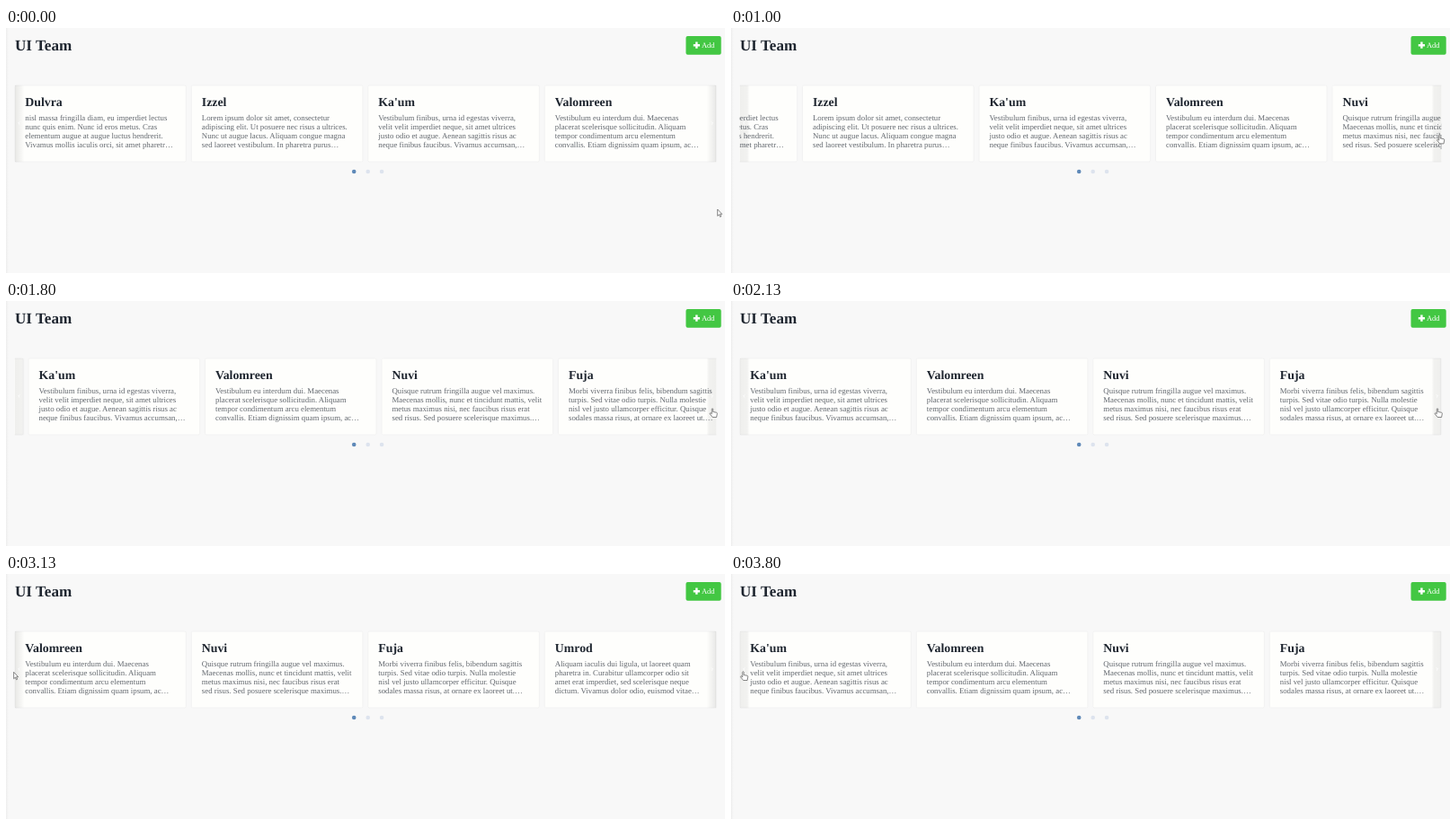
An HTML page that plays this animation: 800 by 273 pixels, repeating every 3.99 s.

```html
<!DOCTYPE html>
<html lang="en">
<head>
<meta charset="utf-8">
<title>Team carousel</title>
<style>
  html, body { margin: 0; width: 100%; height: 100%; overflow: hidden; background: #f8f8f8; }
  svg { display: block; font-family: "Liberation Serif", "Times New Roman", serif; text-rendering: geometricPrecision; }
  .heading { font-weight: bold; fill: #1f2630; }
  .body { font-size: 8.8px; fill: #62676e; }
  .card { fill: #fefefc; stroke: #f0f0f0; stroke-width: .8; }
  .pointer { fill: #fff; stroke: #555; stroke-width: .7; stroke-linejoin: round; }
</style>
</head>
<body>
<svg width="800" height="273" viewBox="0 0 800 273">
  <defs>
    <linearGradient id="shade"><stop stop-opacity=".09"/><stop offset="1" stop-opacity="0"/></linearGradient>
    <linearGradient id="flat"><stop stop-opacity=".06"/><stop offset=".75" stop-opacity=".05"/><stop offset="1" stop-opacity="0"/></linearGradient>
    <linearGradient id="edge"><stop stop-color="#eee"/><stop offset="1" stop-color="#f8f8f8"/></linearGradient>
    <clipPath id="view"><rect x="9.5" y="60" width="781" height="93"/></clipPath>
    <g id="arrow"><rect width="11" height="85.5"/><path d="M5.6 40.6 L4 42.2 L5.6 43.8" fill="none" stroke="#fff" stroke-width="1"/></g>
  </defs>
  <rect width="800" height="273" fill="#f8f8f8"/>
  <rect width="3" height="273" fill="url(#edge)"/>
  <text class="heading" x="10" y="25.3" font-size="17.1">UI Team</text>

  <rect x="756.5" y="9" width="39.2" height="20.8" rx="2" fill="#43c743"/>
  <path d="M764.8 19.2h7.2M768.4 15.6v7.2" stroke="#fff" stroke-width="2.4"/>
  <text x="773.9" y="22.1" font-size="8.5" fill="#fff">Add</text>

  <g clip-path="url(#view)">
    <g id="track"></g>
    <use id="left" href="#arrow" transform="translate(9.7 63.8)"/>
    <use id="right" href="#arrow" transform="translate(790.5 63.8) scale(-1 1)"/>
  </g>

  <g fill="#dde3ee">
    <circle cx="387.2" cy="160" r="2.3" fill="#5f89b8"/>
    <circle cx="402.7" cy="160" r="2.3"/>
    <circle cx="418.1" cy="160" r="2.3"/>
  </g>
  <path id="pointer" class="pointer"/>
</svg>

<script>
const LOOP = 3990, STEP = 1000 / 15, PITCH = 196.5, SLIDE = 400;
const $ = id => document.getElementById(id);

const members = [
  ["Dulvra", "nisl massa fringilla diam, eu imperdiet lectus|nunc quis enim. Nunc id eros metus. Cras|elementum augue at augue luctus hendrerit.|Vivamus mollis iaculis orci, sit amet pharetr…"],
  ["Izzel", "Lorem ipsum dolor sit amet, consectetur|adipiscing elit. Ut posuere nec risus a ultrices.|Nunc ut augue lacus. Aliquam congue magna|sed laoreet vestibulum. In pharetra purus…"],
  ["Ka'um", "Vestibulum finibus, urna id egestas viverra,|velit velit imperdiet neque, sit amet ultrices|justo odio et augue. Aenean sagittis risus ac|neque finibus faucibus. Vivamus accumsan,…"],
  ["Valomreen", "Vestibulum eu interdum dui. Maecenas|placerat scelerisque sollicitudin. Aliquam|tempor condimentum arcu elementum|convallis. Etiam dignissim quam ipsum, ac…"],
  ["Nuvi", "Quisque rutrum fringilla augue vel maximus.|Maecenas mollis, nunc et tincidunt mattis, velit|metus maximus nisi, nec faucibus risus erat|sed risus. Sed posuere scelerisque maximus.…"],
  ["Fuja", "Morbi viverra finibus felis, bibendum sagittis|turpis. Sed vitae odio turpis. Nulla molestie|nisl vel justo ullamcorper efficitur. Quisque|sodales massa risus, at ornare ex laoreet ut.…"],
  ["Umrod", "Aliquam iaculis dui ligula, ut laoreet quam|pharetra in. Curabitur ullamcorper odio sit|amet erat imperdiet, sed scelerisque neque|dictum. Vivamus dolor odio, euismod vitae…"]
];

$("track").innerHTML = members.map(([name, text], i) => `
  <g transform="translate(${9.8 + i * PITCH} 0)">
    <rect class="card" y="64" width="190.6" height="85" rx="1.5"/>
    <text class="heading" x="11.5" y="87.2" font-size="13.8">${name}</text>
    ${text.split("|").map((line, n) => `<text class="body" x="11.5" y="${103 + n * 10.13}">${line}</text>`).join("")}
  </g>`).join("");

// Each click: time and direction
const clicks = [[850, 1], [1535, 1], [2190, 1], [3370, -1]];

// Pointer path: time, x, y
const path = [
  [200, 791.7, 202], [330, 788, 180], [470, 781, 140], [600, 788, 121], [670, 789, 120],
  [870, 789, 120], [1330, 787, 116], [1600, 787, 116], [1800, 786, 119.5], [2220, 786, 119.5],
  [2400, 599, 134], [2530, 330, 122], [2670, 110, 110], [2870, 2, 108], [3000, 3, 109],
  [3130, 8.5, 109.3], [3270, 13.5, 108.5]
];

const shapes = {
  arrow: "M0 0V7.4L1.7 5.9L2.9 8.5L4 8L2.9 5.4H5Z",
  hand: "M-.7 .7Q0 -.5 .7 .7V4L4.6 4.8Q5.4 5 5.3 6L4.6 10H.2L-2.8 6.3Q-2.8 5 -1.8 5.3L-.7 6.3Z",
  beam: "M-1.3 -4H1.3M0 -4V4M-1.3 4H1.3"
};

// cubic-bezier(.25, .1, .25, 1)
function ease(x) {
  if (x <= 0 || x >= 1) return x <= 0 ? 0 : 1;
  let lo = 0, hi = 1, u;
  for (let i = 0; i < 24; i++) {
    u = (lo + hi) / 2;
    if (.75 * u * (1 - u) + u ** 3 < x) lo = u; else hi = u;
  }
  return .3 * u * (1 - u) ** 2 + 3 * u * u * (1 - u) + u ** 3;
}

function pointerAt(t) {
  const next = path.findIndex(p => p[0] > t);
  if (next <= 0) return path.at(next).slice(1);
  const [a, b] = [path[next - 1], path[next]];
  const k = (t - a[0]) / (b[0] - a[0]);
  return [a[1] + (b[1] - a[1]) * k, a[2] + (b[2] - a[2]) * k];
}

function shapeAt(x, y) {
  const overArrow = (x >= 10 && x < 21) || (x >= 780 && x < 790.5);
  if (overArrow && y > 64 && y < 149) return "hand";
  return x >= 21 && x < 780 && y > 95 && y < 137 ? "beam" : "arrow";
}

function draw(t) {
  const position = clicks.reduce((sum, [start, dir]) => sum + dir * ease((t - start) / SLIDE), 0);
  const [x, y] = pointerAt(t);
  const shape = shapeAt(x, y);
  const hover = shape === "hand";
  $("track").setAttribute("transform", `translate(${-position * PITCH} 0)`);
  $("left").setAttribute("fill", hover && position > 0 ? "url(#flat)" : "url(#shade)");
  $("right").setAttribute("fill", hover ? "url(#flat)" : "url(#shade)");
  $("pointer").setAttribute("d", shapes[shape]);
  $("pointer").setAttribute("transform", `translate(${x} ${y})`);
}

const began = performance.now();
function tick() {
  const t = (performance.now() - began) % LOOP;
  draw(Math.floor((t + 5) / STEP) * STEP);
  requestAnimationFrame(tick);
}
tick();
</script>
</body>
</html>
```
